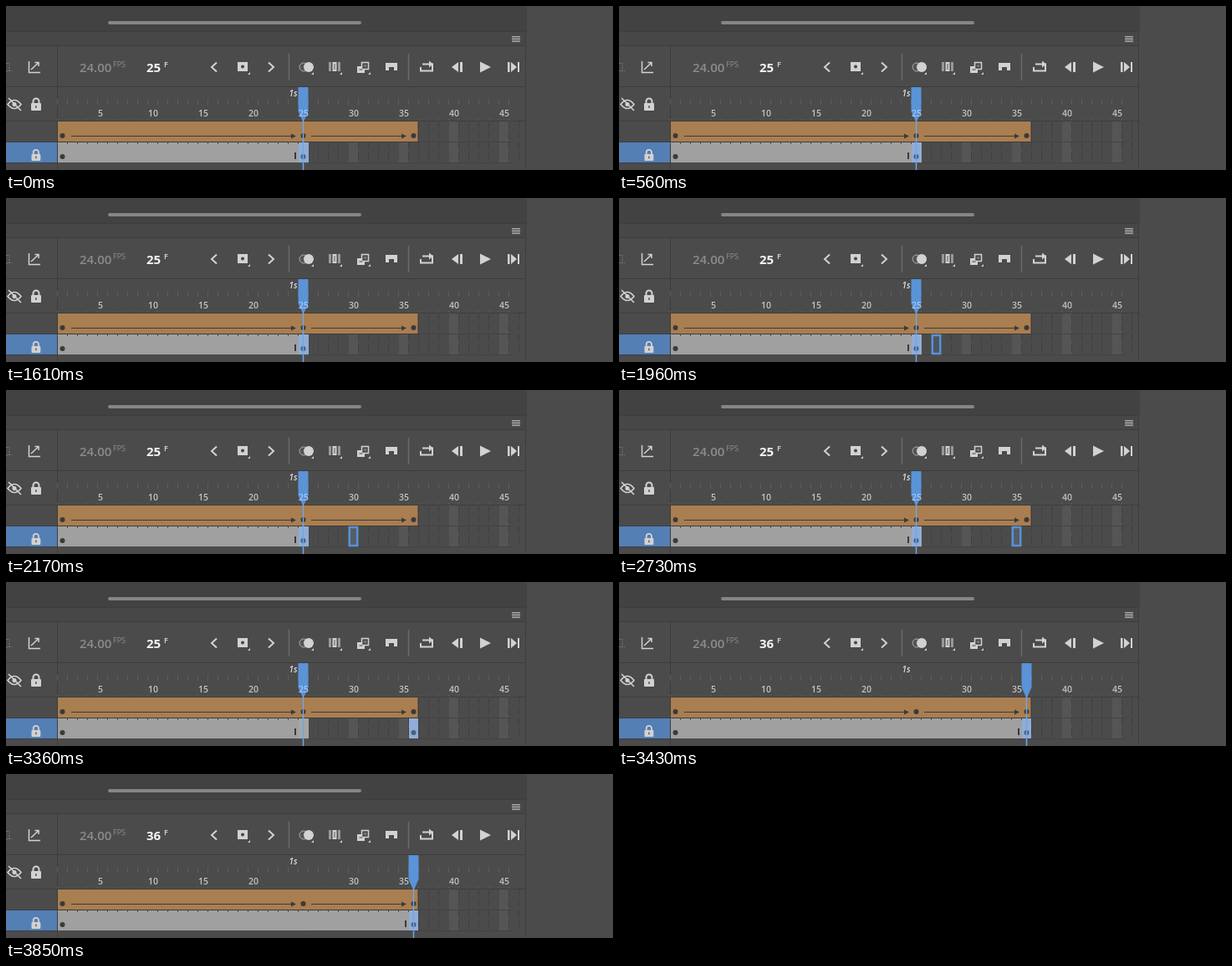
Write an HTML page that moves like this. It is 726 px wide and 196 px high and loops after 3920 ms.

```html
<!DOCTYPE html>
<html lang="en">
<head>
<meta charset="utf-8">
<title>Timeline keyframe drag</title>
<style>
  html, body { margin: 0; width: 100%; height: 100%; overflow: hidden; background: #4b4b4b; }
  svg { display: block; width: 726px; height: 196px; }
  text { font-family: "Open Sans", "Noto Sans", sans-serif; }
  .label { font-size: 10.5px; font-weight: 600; fill: #c4c4c4; }
  .icon { fill: #d2d2d2; }
  .line { fill: none; stroke: #d2d2d2; stroke-width: 2; }
  .ink { fill: #3b3a39; }
  .arrow { fill: none; stroke: #3b3a39; }
</style>
</head>
<body>
<svg viewBox="0 0 726 196">
  <!-- panels -->
  <rect width="726" height="196" fill="#4b4b4b"/>
  <rect width="623" height="30" fill="#424242"/>
  <rect x="122" y="18" width="303" height="4" rx="2" fill="#858585"/>
  <rect y="30" width="621" height="17" fill="#474747"/>
  <path d="M0 30.5H623M0 47.5H621M0 96.5H621M0 137.5H621M0 162.5H62M0 187.5H62M621.5 30V196M61.5 48V196"
        stroke="#3d3d3d" fill="none"/>
  <path d="M605 36.5h10m-10 2h10m-10 2h10m-10 2h10" stroke="#b8b8b8"/>
  <path d="M338.5 57V89M481.5 57V89" stroke="#696969" stroke-width="1.5"/>

  <!-- toolbar -->
  <path d="M0 68.500h4v3M0 77.500h7M4 73v4" fill="none" stroke="#777" stroke-dasharray="2 1"/>
  <g class="line" style="stroke-width:1.5">
    <path d="M27.500 66V79.500H41M30 76L38.500 68M34.500 67.500H39V72"/>
  </g>
  <text x="88" y="79" font-size="15" font-weight="600" fill="#8b8b8b">24.00</text>
  <text x="128" y="73" font-size="9" fill="#909090">FPS</text>
  <text id="count" x="168" y="79" font-size="15" font-weight="700" fill="#f4f4f4"></text>
  <text x="189" y="73" font-size="9" font-weight="600" fill="#ddd">F</text>
  <path class="line" d="M252 67.500L246 73l6 5.500M314 67.500L320 73l-6 5.500"/>
  <rect class="icon" x="277" y="67" width="12" height="11"/>
  <circle cx="283" cy="72.500" r="2" fill="#444"/>
  <circle cx="356" cy="73" r="5" fill="#555" stroke="#aaa"/>
  <circle class="icon" cx="362" cy="73" r="6"/>
  <path d="M386 67h3v11h-3zM397 67h3v11h-3z" fill="#999"/>
  <rect class="icon" x="390.500" y="67" width="5" height="11"/>
  <path d="M393 69v7" stroke="#555"/>
  <rect class="icon" x="420" y="72" width="9" height="8"/>
  <rect x="425.500" y="67.500" width="8" height="8" fill="#4b4b4b" stroke="#d2d2d2" stroke-width="1.5"/>
  <path class="line" d="M422.500 76h4M428 71.500h3"  style="stroke:#888"/>
  <path class="icon" d="M454 68h14v9h-4v-4h-6v4h-4z"/>
  <path class="icon" d="M292 79v3h-3zM368 79v3h-3zM402 79v3h-3zM436 79v3h-3z"/>
  <path class="line" d="M496 73V77.500H510V69.500H498"/>
  <path class="icon" d="M506 65.500l5 4-5 4zM541 67v12l-8-6zM543 67h3v12h-3zM567 66.500l13 6.500-13 6.500zM600 67h2.500v12H600zM604 67v12l7-6zM612 67h2v12h-2z"/>

  <!-- layer column -->
  <path class="line" style="stroke-width:1.6" d="M2 117.500Q10 107.500 18 117.500Q10 127.500 2 117.500zM3 110L18 125"/>
  <circle class="icon" cx="10" cy="117.500" r="2.500"/>
  <rect y="163" width="61" height="24" fill="#547fb4"/>
  <g id="lock">
    <rect class="icon" x="30" y="116" width="12" height="9" rx="1"/>
    <path class="line" d="M32.500 117v-3a3.500 3.500 0 0 1 7 0v3"/>
    <path d="M36 119v3" stroke="#555" stroke-width="1.500"/>
  </g>
  <use href="#lock" transform="translate(3.500 72.500) scale(.9)" />

  <!-- frames -->
  <g id="grid"></g>
  <rect x="62" y="138" width="431" height="24" fill="#a97e50"/>
  <path d="M62 162.500H493M493 138V162" stroke="#3f3b37" fill="none"/>
  <rect id="span" x="62" y="163" height="24" fill="#a0a0a0"/>
  <g id="ticks"></g>
  <rect id="held" x="350" y="163" width="12" height="24"/>
  <rect id="dropped" x="482" y="163" width="11" height="24" fill="#8fadd8"/>
  <rect id="end" class="ink" y="175" width="2" height="8"/>
  <g class="ink">
    <circle cx="67.500" cy="155" r="3"/>
    <circle cx="355.500" cy="155" r="3"/>
    <circle cx="487.500" cy="155" r="3"/>
    <circle cx="67.500" cy="180" r="3"/>
    <circle id="key" cy="180" r="3" fill="#4c5e7c"/>
  </g>
  <path class="arrow" d="M78 155.500H345M365 155.500H478"/>
  <path class="ink" d="M341 152.500l6 3-6 3zM473 152.500l6 3-6 3z"/>
  <rect id="ghost" y="164" width="9.500" height="22" fill="#5b91d7" fill-opacity=".15" stroke="#5b91d7" stroke-width="2.500"/>

  <!-- ruler and playhead -->
  <g id="ruler"></g>
  <text x="338.500" y="108" font-size="10" font-style="italic" font-weight="600" fill="#ddd">1s</text>
  <g id="head">
    <path d="M-6 97H6V126L1 137H-1L-6 126z" fill="#5a93d8"/>
    <path d="M0 136V196" stroke="#72a5e4" stroke-width="1.500"/>
  </g>
  <text id="mark" class="label" x="350" y="132" style="fill:#a9c8ee">25</text>
</svg>
<script>
const $ = id => document.getElementById(id);
const left = n => 61.5 + 12 * (n - 1);
const show = (id, on) => $(id).setAttribute('visibility', on ? 'visible' : 'hidden');
const set = (id, name, value) => $(id).setAttribute(name, value);

let grid = '', ticks = '', ruler = '';
for (let n = 1; n <= 46; n++) {
  const x = left(n);
  ruler += `<path d="M${x} 111v7M${x} 135v2" stroke="#5c5c5c"/>`;
  if (n % 5 == 0 && n != 25) ruler += `<text class="label" x="${x + .5}" y="132">${n}</text>`;
  if (n <= 36) ticks += `<path d="M${x} 162v3" stroke="#4a4a4a"/>`;
  if (n > 25) {
    if (n % 5 == 0) grid += `<rect x="${x}" y="138" width="12" height="49" fill="#555"/>`;
    grid += `<path d="M${x + 12} 138V187" stroke="#404040" stroke-dasharray="9 3"/>`;
  }
}
grid += '<path d="M362 162.500H606M362 187.500H606" stroke="#434343"/>';
$('grid').innerHTML = grid;
$('ticks').innerHTML = ticks;
$('ruler').innerHTML = ruler;

// [start in ms, frame under the pointer]
const drag = [[1820, 26], [1960, 27], [2030, 28], [2100, 29], [2170, 30], [2240, 32],
              [2310, 34], [2730, 35], [3150, 36]];
const DROP = 3290, SEEK = 3430;

function draw(t) {
  const dropped = t >= DROP, done = t >= SEEK;
  const frame = done ? 36 : 25;
  const step = drag.filter(d => t >= d[0]).pop();
  $('count').textContent = frame;
  set('head', 'transform', `translate(${left(frame) + 6} 0)`);
  set('span', 'width', done ? 420 : 288);
  set('end', 'x', done ? 477 : 345);
  set('held', 'fill', dropped ? '#a6a6a6' : '#8fadd8');
  set('key', 'cx', left(dropped ? 36 : 25) + 6);
  show('held', !done);
  show('dropped', dropped);
  show('mark', !done);
  show('ghost', step && !dropped);
  if (step) set('ghost', 'x', left(step[1]) + 1.25);
  [...$('ticks').children].forEach((tick, i) => {
    tick.setAttribute('visibility', i < frame ? 'visible' : 'hidden');
  });
}

function loop() {
  draw(performance.now() % 3920);
  requestAnimationFrame(loop);
}
loop();
</script>
</body>
</html>
```
